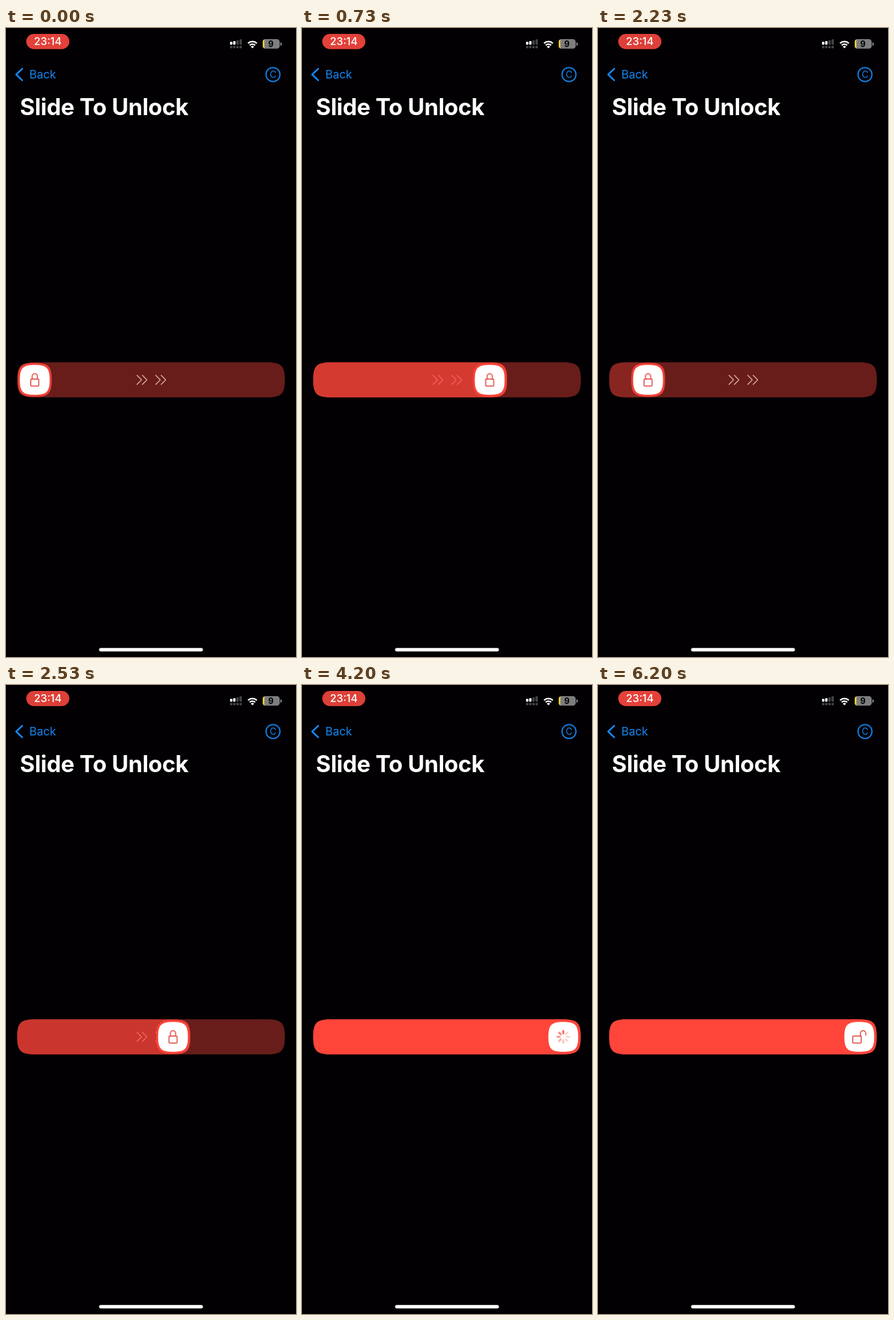
An HTML page for the animation above (6630 ms loop, 444 px wide and 960 px high).

```html
<!DOCTYPE html>
<html lang="en">
<head>
<meta charset="utf-8">
<title>Slide To Unlock</title>
<style>
  @property --x { syntax: "<number>"; inherits: true; initial-value: 44; }

  :root { --loop: 6630ms; --red: #ff453a; --blue: #1485f0; --night: #020003; }
  html, body { margin: 0; width: 100%; height: 100%; overflow: hidden; background: var(--night); }
  svg { display: block; width: 100%; height: 100%; }
  text { font-family: Inter, Roboto, sans-serif; }
  .line { fill: none; stroke-linecap: round; stroke-linejoin: round; }

  /* --x is the centre of the knob; fill and knob both follow it */
  .slider { animation: slide var(--loop) linear infinite; }
  .fill, .knob { transform: translate(calc(var(--x) * 1px), 537px); }
  .fill { fill: var(--red); opacity: calc((var(--x) + 10) / 410); }

  @keyframes slide {
    0%     { --x: 44; animation-timing-function: cubic-bezier(.4, 0, .55, 1); }
    6.03%  { --x: 368; animation-timing-function: cubic-bezier(.4, 0, .4, 1); }
    9.8%   { --x: 289; }
    11.31% { --x: 287; animation-timing-function: linear(0, .139, .388, .618, .787, .895, .953, .983, .997, 1.001, 1.002, 1.002, 1.002, 1.001, 1); }
    21.87% { --x: 44; }
    28.36% { --x: 44; animation-timing-function: cubic-bezier(.5, 0, .85, .43); }
    33.63% { --x: 76.200; animation-timing-function: cubic-bezier(.33, .19, .67, .61); }
    38.16% { --x: 255; animation-timing-function: cubic-bezier(.17, .5, .3, 1); }
    47.51%, 100% { --x: 400; }
  }

  .lock { animation: lock var(--loop) step-end infinite; }
  .spinner { animation: spinner var(--loop) linear infinite; }
  .open { animation: open var(--loop) linear infinite; }
  @keyframes lock { 0% { opacity: 1; } 56.86%, 100% { opacity: 0; } }
  @keyframes spinner {
    0%, 56.85% { opacity: 0; }
    56.86%, 77.98% { opacity: 1; }
    78.88%, 100% { opacity: 0; }
  }
  @keyframes open { 0%, 77.98% { opacity: 0; } 78.88%, 100% { opacity: 1; } }

  /* seven turns per loop keep the spinner in step */
  .spinner use {
    --turn: calc(var(--loop) / 7);
    transform: rotate(calc(var(--k) * 45deg));
    animation: petal var(--turn) linear infinite;
    animation-delay: calc(411ms + (var(--k) / 8 - 2) * var(--turn));
  }
  @keyframes petal { 0%, 100% { opacity: .85; } 60%, 88% { opacity: .25; } }

  .pill { animation: pulse var(--loop) linear infinite; }
  @keyframes pulse {
    0%, 14% { fill: #e3413a; }
    18.5%, 28.6% { fill: #ff473d; }
    33%, 90.5% { fill: #dd4038; }
    93.5%, 100% { fill: #e5413a; }
  }
</style>
</head>
<body>
<svg viewBox="0 0 444 960" preserveAspectRatio="none">
  <defs>
    <path id="chevrons" class="line" d="M200.500 530l7 7l-7 7M208.800 530l7 7l-7 7"/>
    <path id="petal" class="line" d="M0 -5.200V-9.100" stroke="#ff453a" stroke-width="2.800"/>
    <path id="squircle" d="M0 -1C.8 -1 1 -.8 1 0S.8 1 0 1S-1 .8 -1 0S-.8 -1 0 -1z"/>
    <path id="track" d="M44 510.250H400C421.400 510.250 426.900 515.600 426.900 537S421.400 563.750 400 563.750H44C22.600 563.750 17.100 558.400 17.100 537S22.600 510.250 44 510.250z"/>
    <clipPath id="bounds"><use href="#track"/></clipPath>
    <clipPath id="cell"><rect x="393" y="17" width="26" height="14.500" rx="4.300"/></clipPath>
  </defs>
  <rect width="444" height="960" fill="var(--night)"/>

  <!-- status bar -->
  <rect class="pill" x="31" y="9" width="66" height="23.200" rx="11.600"/>
  <text x="64" y="26.200" text-anchor="middle" font-size="16.300" font-weight="500" fill="#fff">23:14</text>
  <g fill="#fff">
    <rect x="343" y="21" width="3.600" height="4.500" rx="1"/>
    <rect x="347.800" y="20" width="3.600" height="5.500" rx="1"/>
  </g>
  <g fill="#444446">
    <rect x="352.700" y="18.700" width="3.600" height="6.800" rx="1"/>
    <rect x="357.500" y="17.300" width="3.600" height="8.200" rx="1"/>
    <rect x="343" y="27.300" width="3.600" height="3.700" rx="1"/>
    <rect x="347.800" y="27.300" width="3.600" height="3.700" rx="1"/>
    <rect x="352.700" y="27.300" width="3.600" height="3.700" rx="1"/>
    <rect x="357.500" y="27.300" width="3.600" height="3.700" rx="1"/>
  </g>
  <g fill="none" stroke="#fff" stroke-width="2.400">
    <path d="M370.600 23.300a9.600 9.600 0 0 1 13.400 0"/>
    <path d="M373.200 26.300a5.900 5.900 0 0 1 8.200 0"/>
  </g>
  <path d="M374.800 28.400a3.600 3.600 0 0 1 5 0L377.300 31z" fill="#fff"/>
  <g clip-path="url(#cell)">
    <rect x="393" y="17" width="26" height="15" fill="#7d7d80"/>
    <rect x="393" y="17" width="2.600" height="15" fill="#f5cf2e"/>
  </g>
  <path d="M420 22v5a2.500 2.500 0 0 0 0 -5z" fill="#7d7d80"/>
  <text x="405.600" y="28.700" text-anchor="middle" font-size="12.500" font-weight="700">9</text>

  <!-- navigation -->
  <path class="line" d="M24.800 62.200L15.600 71L24.800 79.800" stroke="var(--blue)" stroke-width="2.600"/>
  <text x="35.800" y="77.300" font-size="17.500" fill="var(--blue)">Back</text>
  <circle cx="408.800" cy="71" r="10.700" fill="none" stroke="var(--blue)" stroke-width="1.800"/>
  <text x="408.800" y="76" text-anchor="middle" font-size="14" fill="var(--blue)">C</text>
  <text x="21.300" y="133.300" font-size="35" font-weight="700" letter-spacing="-.32" fill="#fff">Slide To Unlock</text>

  <!-- slider -->
  <g class="slider">
    <use href="#track" fill="#681d1a"/>
    <g stroke="#dfb2af" stroke-width="1.250">
      <use href="#chevrons"/>
      <use href="#chevrons" x="28.700"/>
    </g>
    <g clip-path="url(#bounds)">
      <path class="fill" d="M-400 -27H0C21.500 -27 26.700 -21.500 26.700 0S21.500 27 0 27H-400z"/>
    </g>
    <g class="knob">
      <use href="#squircle" transform="scale(25.800)" fill="var(--red)" opacity=".9"/>
      <use href="#squircle" transform="scale(22.800)" fill="#fff"/>
      <g class="line lock" stroke="#e0423a" stroke-width="1.500">
        <rect x="-6.200" y="-1.200" width="12.400" height="10.700" rx="1.300"/>
        <path d="M-4 -1.200V-5.300a4 4.300 0 0 1 8 0V-1.200"/>
      </g>
      <g class="spinner">
        <use href="#petal" style="--k:0"/>
        <use href="#petal" style="--k:1"/>
        <use href="#petal" style="--k:2"/>
        <use href="#petal" style="--k:3"/>
        <use href="#petal" style="--k:4"/>
        <use href="#petal" style="--k:5"/>
        <use href="#petal" style="--k:6"/>
        <use href="#petal" style="--k:7"/>
      </g>
      <g class="line open" stroke="#e0423a" stroke-width="1.500">
        <rect x="-10" y="-1.200" width="13" height="10.700" rx="1.300"/>
        <path d="M1.800 -1.200V-5.300a4.100 4.300 0 0 1 8.200 0V-2.800"/>
      </g>
    </g>
  </g>

  <rect x="142.500" y="946.200" width="159" height="5.200" rx="2.600" fill="#fff"/>
</svg>
</body>
</html>
```
